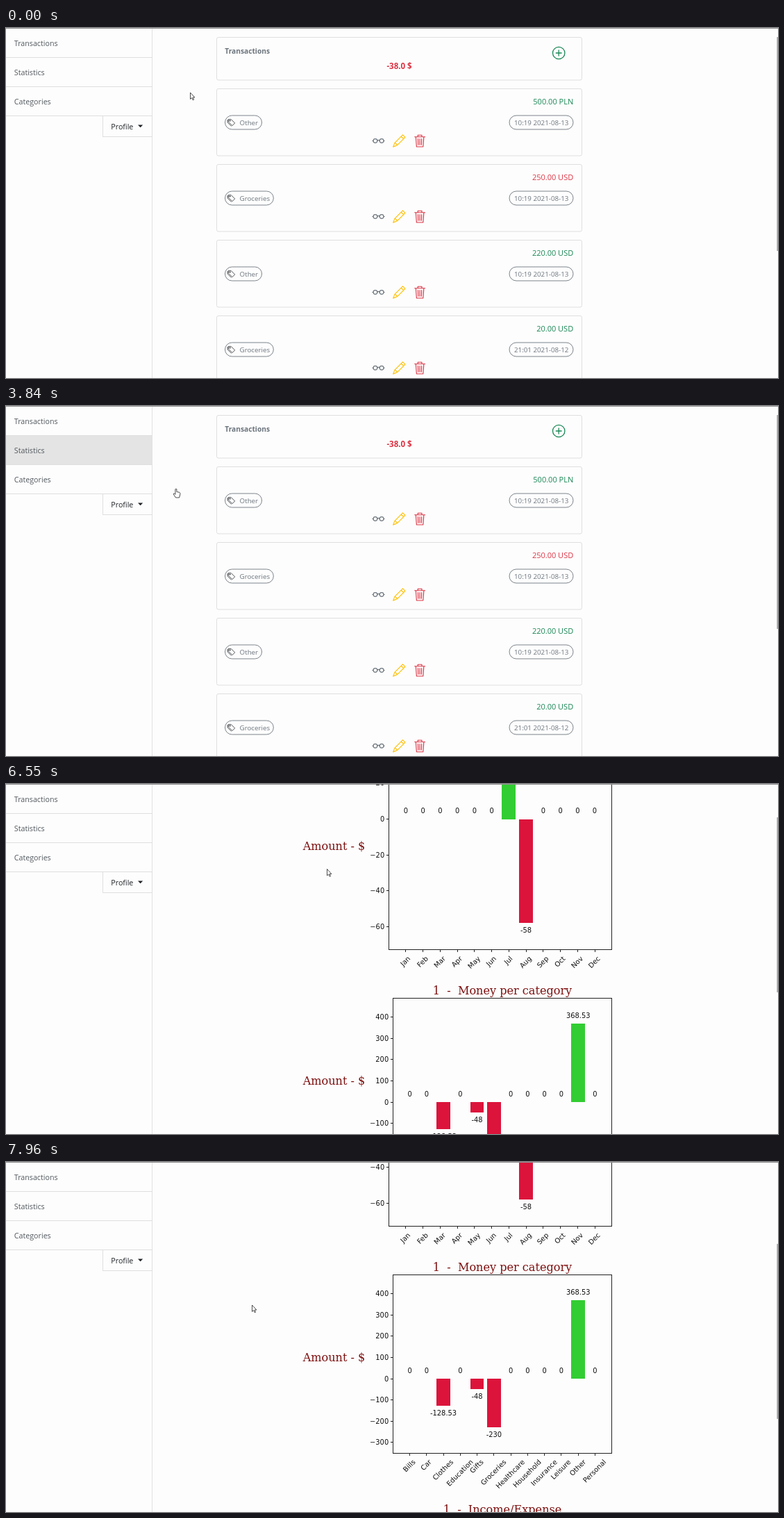
These frames come from a looping animation (1112x504 px, 8000 ms). An HTML page:

```html
<!DOCTYPE html>
<html lang="en">
<head>
<meta charset="utf-8">
<title>Budget</title>
<style>
html, body { margin: 0; width: 100%; height: 100%; overflow: hidden; background: #fdfdfd; }
svg { display: block; width: 100%; height: 100%; }
text { font-family: "Open Sans", "Noto Sans", sans-serif; font-size: 10.7px; white-space: pre; }
.small { font-size: 9.75px; fill: #6c757d; }
.money { font-size: 11px; }
.plot { font-family: "DejaVu Sans", sans-serif; font-size: 9.9px; fill: #111; }
.title { font-family: "DejaVu Serif", serif; font-size: 16.1px; fill: #7d1010; }
.box { fill: none; stroke: #dfdfdf; }
.axis { fill: none; stroke: #222; shape-rendering: crispEdges; }
.bar { shape-rendering: crispEdges; }
.icon { fill: none; stroke-linejoin: round; stroke-linecap: round; }
.mouse { fill: #fff; stroke: #222; stroke-width: .8; stroke-linejoin: round; }
</style>
</head>
<body>
<svg viewBox="0 0 1112 504" preserveAspectRatio="none">
  <defs>
    <g id="glasses" class="icon" stroke="#6c757d">
      <circle cx="4" cy="8" r="2.5"/><circle cx="12" cy="8" r="2.5"/>
      <path d="M.5 8h1M14.5 8h1M6.5 8q1.5-2 3 0"/>
    </g>
    <path id="pencil" class="icon" stroke="#ffc107" d="M12.5.5l3 3-10 10-5 2 2-5zM10.8 2.8l2.5 2.5M3 10.5l2.5 2.5"/>
    <path id="trash" class="icon" stroke="#dc3545" d="M1.5 3h13M5.5 3V.8h5V3M3 3l.9 12.4h8.2L13 3M5.7 5.5l.3 7.5M8 5.5V13M10.3 5.5L10 13"/>
    <g id="tags" class="icon" stroke="#212529" stroke-width="1.1">
      <path d="M2.5 1.5h5.1l7.4 7.4-5 5.2-7.5-7.4zM.5 2.8v4.8l7.3 7.3"/>
      <circle cx="5" cy="4.2" r=".9"/>
    </g>
  </defs>
  <g id="list"></g>
  <g id="stats"></g>
  <rect id="thumb" x="1110.4" width="1.6" fill="#a2a2a2"/>
  <g id="side"></g>
  <rect width="1112" height="1" fill="#929292"/>
  <path id="arrow" class="mouse" d="M0 0V9.4L2.2 7.5 3.7 10.8 5.1 10.2 3.6 7H6.4Z"/>
  <path id="hand" class="mouse" d="M-1 8.4V1Q0-.5 1 1V4.6L5 5.4Q6.1 5.8 6 8L4.7 13H-.5L-3.6 8.2Q-3.5 6.5-2.4 7Z"/>
</svg>
<script>
const $ = id => document.getElementById(id);
const LOOP = 8000, PAGE_SWAP = 4300, TICK = 73;
const GREEN = '#198754', RED = '#dc3545';

const text = (x, y, s, attrs = '') => `<text x="${x}" y="${y}" ${attrs}>${s}</text>`;
const rect = (x, y, w, h, attrs) => `<rect x="${x}" y="${y}" width="${w}" height="${h}" ${attrs}/>`;
const icon = (id, x, y, scale = 1.15) => `<use href="#${id}" transform="translate(${x} ${y}) scale(${scale})"/>`;
const pill = (x, y, w) => rect(x, y, w, 20, 'rx="10" fill="none" stroke="#7c848b"');

function sidebar() {
  let s = rect(0, 43, 210, 41, 'id="hover" fill="#e4e4e4"');
  ['Transactions', 'Statistics', 'Categories'].forEach((name, i) => {
    s += text(11.8, 26 + i * 41.8, name, 'fill="#52585e"')
      + rect(0, 42 + i * 42, 210, 1, 'fill="#dfdfdf"');
  });
  return s + rect(210, 0, 1, 504, 'fill="#e2e2e2"')
    + rect(139.5, 126.5, 71, 30, 'class="box"')
    + text(151.3, 146, 'Profile', 'fill="#212529"')
    + '<path d="M190 139.5h7.2l-3.6 3.8z" fill="#212529"/>';
}

function card([amount, color, tag, date], i) {
  const y = 87 + 109 * i;
  return rect(303.5, y + .5, 526, 96.5, 'rx="2.5" class="box"')
    + text(817.2, y + 22.5, amount, `class="money" text-anchor="end" fill="${color}"`)
    + pill(315.5, y + 39, 32 + 4.2 * tag.length)
    + icon('tags', 318.8, y + 43.5, .72)
    + text(336.6, y + 52.5, tag, 'class="small"')
    + pill(725, y + 39, 92)
    + text(771.2, y + 52.5, date, 'class="small" text-anchor="middle"')
    + ['glasses', 'pencil', 'trash'].map((id, k) => icon(id, 527.3 + 29.8 * k, y + 66.3)).join('');
}

function transactions() {
  const bold = (size, color) => `font-weight="700" style="font-size:${size}px" fill="${color}"`;
  return rect(303.5, 13.5, 526, 61.5, 'rx="2.5" class="box"')
    + text(315.3, 37, 'Transactions', bold(10.2, '#6c757d'))
    + text(566.5, 58.5, '-38.0 $', bold(11.5, RED) + ' text-anchor="middle"')
    + `<g fill="none" stroke="${GREEN}" stroke-width="1.3"><circle cx="796.2" cy="36" r="8.7"/><path d="M796.2 31.6v8.8M791.8 36h8.8"/></g>`
    + [
      ['500.00 PLN', GREEN, 'Other', '10:19 2021-08-13'],
      ['250.00 USD', RED, 'Groceries', '10:19 2021-08-13'],
      ['220.00 USD', GREEN, 'Other', '10:19 2021-08-13'],
      ['20.00 USD', GREEN, 'Groceries', '21:01 2021-08-12']
    ].map(card).join('');
}

// Bar chart; unit is pixels per value, zero the y of value 0
function chart({ title, left, top, bottom, zero, unit, max, min, step, names, values }) {
  const width = 872.5 - left, mid = 'class="plot" text-anchor="middle"';
  const bar = .8, pitch = width / (1.1 * (names.length - 1 + bar));
  const heading = 'class="title" text-anchor="middle"';
  let s = text(left + width / 2, top - 5.5, title, heading)
    + text(472.5, (top + bottom) / 2 - 3.2, 'Amount - $', heading);
  for (let v = max; v >= min; v -= step) {
    const y = zero - v * unit;
    s += `<path d="M${left - 3.5} ${y}h3.5" class="axis"/>`
      + text(left - 6.3, y + 3.6, String(v).replace('-', '\u2212'), 'class="plot" text-anchor="end"');
  }
  names.split(' ').forEach((name, i, all) => {
    const gap = width / (1.1 * (all.length - 1 + bar));
    const x = left + width / 2 + (i - (all.length - 1) / 2) * gap;
    const v = values[name] || 0, y = zero - v * unit;
    if (v) s += rect(x - gap * bar / 2, Math.min(y, zero), gap * bar, Math.abs(v * unit), `class="bar" fill="${v > 0 ? '#32cd32' : '#dc143c'}"`);
    s += text(x, v < 0 ? y + 13.8 : y - 8.4, v, mid)
      + `<path d="M${x} ${bottom}v3.5" class="axis"/>`
      + text(0, 3.5, name, `${mid} data-x="${x - .8}" data-top="${bottom + 8}"`);
  });
  return s + rect(left, top, width, bottom - top, 'class="axis"');
}

function statistics() {
  return chart({
    title: '1  -  Money per month', left: 551.5, top: 30.5, bottom: 311.5,
    zero: 123.5, unit: 2.582, max: 20, min: -60, step: 20,
    names: 'Jan Feb Mar Apr May Jun Jul Aug Sep Oct Nov Dec',
    values: { Jul: 20, Aug: -58 }
  }) + chart({
    title: '1  -  Money per category', left: 557.5, top: 381, bottom: 638,
    zero: 531, unit: .3063, max: 400, min: -300, step: 100,
    names: 'Bills Car Clothes Education Gifts Groceries Healthcare Household Insurance Leisure Other Personal',
    values: { Clothes: -128.53, Gifts: -48, Groceries: -230, Other: 368.53 }
  }) + text(715, 725, '1  -  Income/Expense', 'class="title" text-anchor="middle"');
}

// Tilted labels hang so that the tops of their bounds line up
function tiltLabels() {
  document.querySelectorAll('[data-top]').forEach(el => {
    const half = (el.getComputedTextLength() + 9) * Math.SQRT1_2 / 2;
    el.setAttribute('transform', `translate(${el.dataset.x} ${+el.dataset.top + half}) rotate(-45)`);
  });
}

function ease(t, from, to) {
  const k = Math.min(1, Math.max(0, (t - from) / (to - from)));
  return k * k * (3 - 2 * k);
}

// Mouse moves: start, end, x and y reached
const moves = [
  [150, 660, 269.5, 82.5], [1850, 2570, 181.7, 78.3],
  [3450, 3850, 245, 119], [3850, 4130, 295.5, 108], [4300, 4440, 298.7, 104],
  [4890, 5040, 399.5, 102], [5240, 5440, 473, 90], [5560, 5700, 490, 92], [5700, 5880, 472.5, 115.3],
  [6360, 6480, 462.5, 122.5], [6610, 6810, 397, 180], [7000, 7200, 354.5, 206]
];

function mouseAt(t) {
  let x = 265.5, y = 93;
  for (const [from, to, toX, toY] of moves) {
    const k = ease(t, from, to);
    x += (toX - x) * k;
    y += (toY - y) * k;
  }
  return [x, y];
}

const show = (id, on) => $(id).setAttribute('visibility', on ? 'visible' : 'hidden');

function render(t) {
  const onStats = t >= PAGE_SWAP;
  const [x, y] = mouseAt(t);
  // The clicked row stays lit until the next page arrives
  const hovering = !onStats && (t > 3000 || x < 210);
  const scroll = Math.round(TICK * (ease(t, 6380, 6550) + ease(t, 7140, 7310) + ease(t, 7710, 7950)));

  show('list', !onStats);
  show('stats', onStats);
  show('hover', hovering);
  show('arrow', !hovering);
  show('hand', hovering);
  $('stats').setAttribute('transform', `translate(0 ${-scroll})`);
  $('thumb').setAttribute('y', 13 + scroll * .479);
  $('thumb').setAttribute('height', onStats ? 252 : 308);
  for (const id of ['arrow', 'hand']) $(id).setAttribute('transform', `translate(${x} ${y})`);
}

$('list').innerHTML = transactions();
$('stats').innerHTML = statistics();
$('side').innerHTML = sidebar();
tiltLabels();

const start = performance.now();
function tick() {
  render((performance.now() - start) % LOOP);
  requestAnimationFrame(tick);
}
tick();
</script>
</body>
</html>
```
